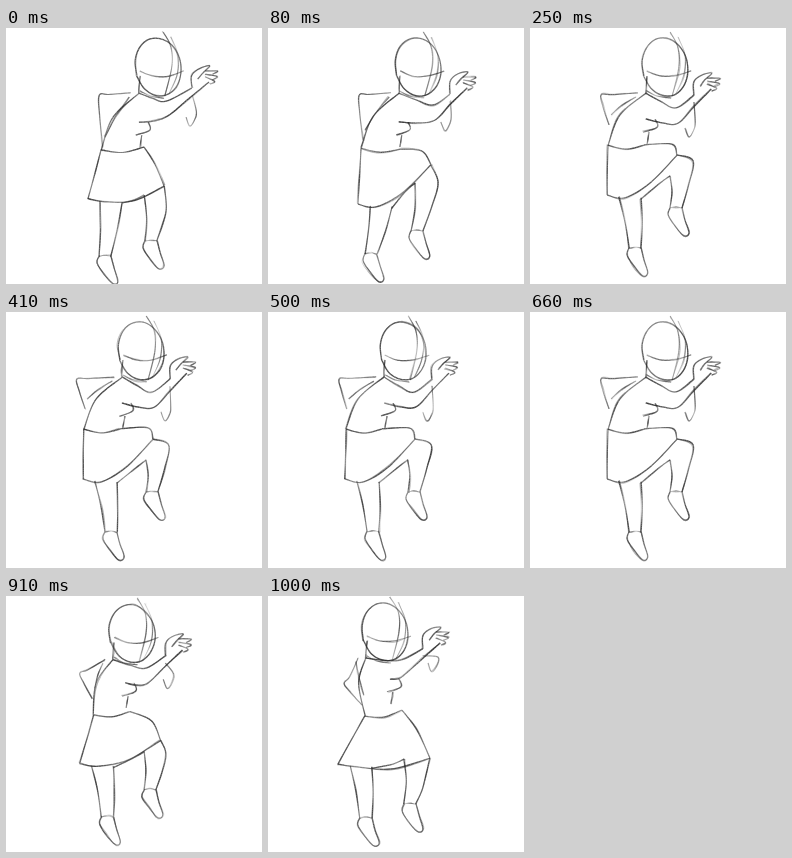
Recreate the animation shown at these times as an HTML page with a canvas. Size 256x256 px, loop 1.08 s.

```html
<!DOCTYPE html>
<html>
<head>
<meta charset="utf-8">
<style>
html, body { margin: 0; width: 100%; height: 100%; overflow: hidden; background: #fff; }
canvas { display: block; width: 256px; height: 256px; }
</style>
</head>
<body>
<canvas id="c" width="256" height="256"></canvas>
<script>
const ctx = document.getElementById('c').getContext('2d');

// Poses are joints only; the outline is built from them by sketch().
const reach = {
  head: [152, 39], waistL: [95, 122], waistR: [138, 119],
  pack: [93, 67], packEnd: [97, 119], armpit: [133, 94],
  elbow: [160, 73], wrist: [186, 60], cuff: [184, 98],
  hemL: [82, 171], hip: [149, 136], hemR: [158, 158],
  knee: [160, 180], kneeIn: [138, 167], ankleL: [99, 228], ankleR: [145, 213]
};
const lift = {
  head: [150, 39], waistL: [93, 120], waistR: [133, 121],
  pack: [91, 67], packEnd: [95, 112], armpit: [131, 94],
  elbow: [165, 77], wrist: [182, 66], cuff: [177, 103],
  hemL: [90, 176], hip: [154, 123], hemR: [163, 137],
  knee: [170, 155], kneeIn: [147, 155], ankleL: [103, 226], ankleR: [149, 203]
};
const step = {
  head: [135, 39], waistL: [78, 117], waistR: [114, 117],
  pack: [71, 67], packEnd: [79, 97], armpit: [116, 91],
  elbow: [146, 80], wrist: [164, 67], cuff: [159, 109],
  hemL: [77, 167], hip: [142, 116], hemR: [147, 127],
  knee: [163, 133], kneeIn: [140, 148], ankleL: [105, 220], ankleR: [146, 180]
};
const stand = {
  head: [117, 36], waistL: [97, 120], waistR: [134, 114],
  pack: [76, 87], packEnd: [94, 109], armpit: [122, 83],
  elbow: [134, 64], wrist: [155, 53], cuff: [164, 76],
  hemL: [70, 168], hip: [149, 134], hemR: [162, 162],
  knee: [157, 182], kneeIn: [136, 163], ankleL: [98, 222], ankleR: [142, 208]
};

const add = ([x, y], dx, dy) => [x + dx, y + dy];
const lerp = (a, b, t = 0.5) => a.map((v, i) => v + (b[i] - v) * t);
const between = (a, b) => Object.fromEntries(Object.keys(a).map(k => [k, lerp(a[k], b[k])]));

let seed;
function rand() {
  const v = Math.sin(++seed * 12.9898) * 43758.5453;
  return v - Math.floor(v);
}

// Point on a Catmull-Rom spline through p, u in 0..1
function along(p, u) {
  const last = p.length - 1, v = u * last;
  const i = Math.min(Math.floor(v), last - 1), t = v - i;
  const a = p[Math.max(i - 1, 0)], b = p[i], c = p[i + 1], d = p[Math.min(i + 2, last)];
  return [0, 1].map(k => b[k] + t / 2 * (c[k] - a[k]
    + t * (2 * a[k] - 5 * b[k] + 4 * c[k] - d[k]
    + t * (3 * (b[k] - c[k]) + d[k] - a[k]))));
}

// One pencil pass: slightly misplaced, with pressure that swells and fades
function pass(points, dark, stray) {
  const p = points.map(q => add(q, (rand() - 0.5) * stray, (rand() - 0.5) * stray));
  const n = 8 * p.length, phase = rand() * 6;
  for (let i = 0; i < n; i++) {
    const press = dark + 0.14 * Math.sin(i / n * 8 + phase);
    ctx.strokeStyle = `rgba(35,35,35,${press})`;
    ctx.lineWidth = 0.8 + 0.7 * press;
    ctx.beginPath();
    ctx.moveTo(...along(p, i / n));
    ctx.lineTo(...along(p, (i + 1) / n));
    ctx.stroke();
  }
}

function line(points, dark = 0.65) {
  pass(points, dark, 0.6);
  pass(points, dark * 0.4, 2);
}

function foot(ankle) {
  const at = (x, y) => add(ankle, x, y);
  line([at(-6, 0), at(-8, 7), at(-1, 18), at(8, 28), at(13, 25), at(9, 12), at(6, 0)]);
  line([at(-6, 0), at(0, -1), at(6, 0)], 0.4);
}

function sketch(j) {
  const face = (x, y) => add(j.head, x, y);
  const hand = (x, y) => add(j.wrist, x, y);
  const nape = face(-19, 26);

  // head: an ellipse whose chin leans forward
  line(Array.from({ length: 13 }, (_, i) => {
    const a = Math.PI * (i / 6 + 0.9);
    return face(23 * Math.cos(a) + 2 * Math.sin(a), 29 * Math.sin(a));
  }));
  line([face(5, -35), face(13, -20), face(14, 0), face(7, 29)], 0.45);
  line([face(13, -30), face(20, -12), face(19, 8), face(11, 27)], 0.35);
  line([face(-18, 4), face(-5, 9), face(10, 9), face(26, 4)], 0.5);

  // torso and backpack
  line([face(-18, 9), face(-19, 20), nape]);
  line([face(-18, 24), face(-8, 29), face(6, 31)], 0.45);
  line([nape, add(lerp(nape, j.waistL), -7, -4), j.waistL]);
  line([add(nape, -8, 0), lerp(j.pack, nape, 0.25), j.pack, add(lerp(j.pack, j.packEnd, 0.4), -1, 0), j.packEnd], 0.55);
  line([add(nape, -10, 4), add(lerp(nape, j.packEnd), -5, -4), add(j.packEnd, 2, -10)], 0.55);
  line([add(j.armpit, 9, 0), add(j.armpit, 11, 8), add(j.armpit, -3, 13)]);
  line([add(j.armpit, 3, 13), add(j.armpit, 1, 25)]);

  // arm, hand, sleeve
  const under = add(j.elbow, 2, 15);
  line([nape, add(lerp(nape, j.elbow), 0, 1), j.elbow, j.wrist]);
  line([j.armpit, add(lerp(j.armpit, under), 0, 2), under, lerp(under, hand(17, -6)), hand(17, -6)], 0.72);
  line([j.wrist, hand(0, -13), hand(8, -20), hand(18, -22), hand(11, -15), hand(6, -9)], 0.6);
  for (let i = 0; i < 3; i++) {
    const a = i * 0.45 - 0.15, x = 14 + 12 * Math.cos(a), y = 12 * Math.sin(a) - 15;
    line([hand(13, 3 * i - 17), hand(x, y), hand(x - 5, y + 3)], 0.55);
  }
  line([hand(0, 7), add(j.cuff, 6, -15), add(j.cuff, 5, -7), j.cuff, add(j.cuff, -4, -9)], 0.45);

  // skirt
  line([j.waistL, add(lerp(j.waistL, j.waistR), 0, 4), j.waistR]);
  line([j.waistL, lerp(j.waistL, j.hemL), j.hemL]);
  line([j.waistR, j.hip, j.hemR]);
  line([j.hemL, add(j.hemL, 18, 3), add(lerp(j.hemL, j.hemR), 8, 8), j.hemR]);
  line([add(j.hemL, 34, 4), add(lerp(j.hemL, j.kneeIn, 0.8), 2, 4), j.kneeIn], 0.6);

  // legs
  line([add(j.hemL, 12, 2), add(lerp(j.hemL, j.ankleL), 4, 0), add(j.ankleL, -6, 0)]);
  line([add(j.hemL, 34, 3), add(lerp(j.hemL, j.ankleL), 21, 2), add(j.ankleL, 6, 0)]);
  line([j.hemR, j.knee, add(lerp(j.knee, j.ankleR), 4, 0), add(j.ankleR, 6, 0)], 0.7);
  line([j.kneeIn, add(lerp(j.kneeIn, j.ankleR), -1, 0), add(j.ankleR, -6, 0)]);
  foot(j.ankleL);
  foot(j.ankleR);
}

// Distinct drawings; the held step is redrawn three times
const drawings = [reach, lift, between(lift, step), step, step, step, between(step, stand), stand];
const order = [0, 1, 2, 3, 4, 3, 5, 3, 4, 3, 5, 6, 7];
const loop = 1080;

let shown;
function tick() {
  const t = performance.now() - begin;
  const id = order[Math.floor((t % loop + 3) / loop * order.length) % order.length];
  if (id !== shown) {
    shown = id;
    seed = id * 1000;
    ctx.fillStyle = '#fff';
    ctx.fillRect(0, 0, 256, 256);
    ctx.lineCap = 'butt';
    sketch(drawings[id]);
  }
  requestAnimationFrame(tick);
}
const begin = performance.now();
tick();
</script>
</body>
</html>
```
